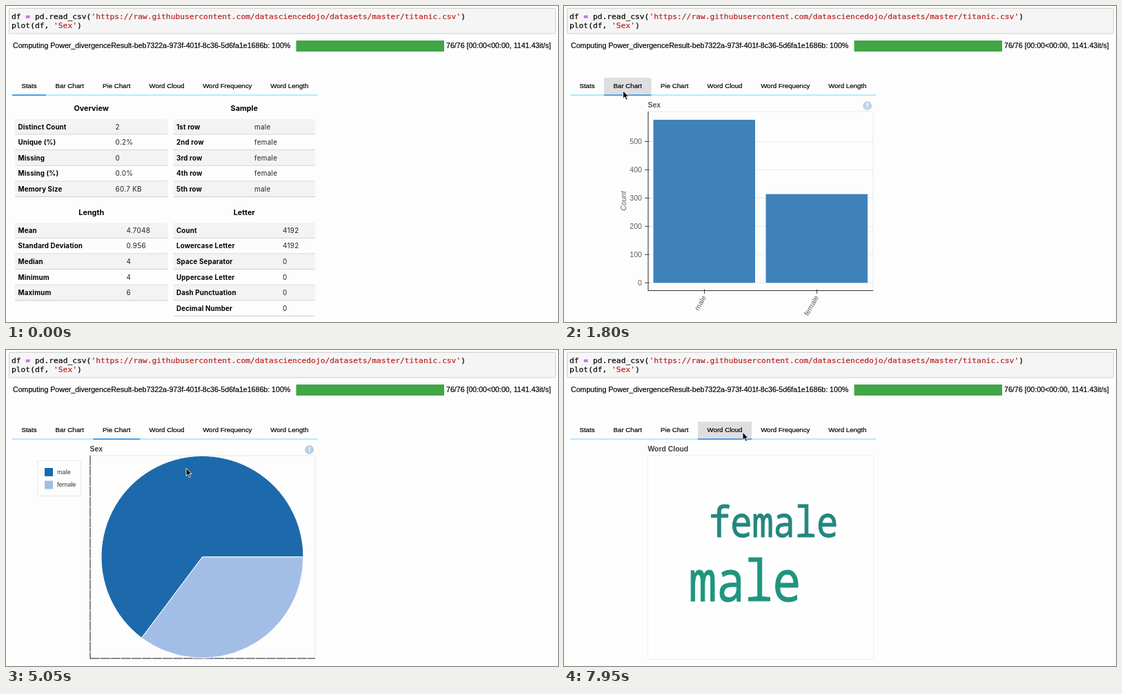
These frames come from a looping animation (800x458 px, 8 s). An HTML page:

```html
<!DOCTYPE html>
<html lang="en">
<head>
<meta charset="utf-8">
<title>Column plots</title>
<style>
  html, body { margin: 0; width: 100%; height: 100%; overflow: hidden; background: #fdfdfe; }
  svg { display: block; width: 100vw; height: 100vh; }
  text { font-family: "Liberation Sans", Arial, sans-serif; white-space: pre; }
  .code { font: 11.28px "DejaVu Sans Mono", monospace; stroke: #000; stroke-width: .2; }
  .str { fill: #ba2121; stroke: #ba2121; }
  .op { fill: #aa22ff; stroke: none; font-weight: 700; }
  .log { font-size: 10.62px; stroke: #000; stroke-width: .2; }
  .tab { font-size: 9.66px; text-anchor: middle; stroke: #000; stroke-width: .2; }
  .head { font: 700 10.8px Inter, sans-serif; text-anchor: middle; }
  .key { font: 700 9.75px Inter, sans-serif; letter-spacing: .15px; }
  .val { font: 9.9px Inter, sans-serif; letter-spacing: .3px; fill: #222; }
  .title { font-size: 10.4px; font-weight: 700; fill: #3c3c3c; }
  .axis { font-size: 10.6px; fill: #444; }
  .legend { font-size: 9.1px; fill: #333; }
  .tip { font-size: 9.45px; font-weight: 700; fill: #fff; }
  .cloud { font-family: "Noto Sans Mono", monospace; stroke-width: .9; }
</style>
</head>
<body>
<svg id="stage" viewBox="0 0 800 458"></svg>
<script>
const LOOP = 8000;
const FADE = 350;
const stage = document.getElementById('stage');

const text = (x, y, cls, str, attrs = '') => `<text x="${x}" y="${y}" class="${cls}" ${attrs}>${str}</text>`;
const rect = (x, y, w, h, fill, attrs = '') =>
  `<rect x="${x}" y="${y}" width="${w}" height="${h}" fill="${fill}" ${attrs}/>`;
const line = (x1, y1, x2, y2, color, attrs = '') =>
  `<path d="M${x1} ${y1}L${x2} ${y2}" stroke="${color}" fill="none" ${attrs}/>`;
const frame = bottom => rect(122, 153, 326, bottom - 153, 'none', 'stroke="#e5e5e5"');
const group = (id, body) => `<g id="${id}">${body}</g>`;

// Tabs: name, left edge, right edge, click time
const tabs = [
  ['Stats', 9, 58, -1000],
  ['Bar Chart', 58, 126.5, 1500],
  ['Pie Chart', 126.5, 194, 3250],
  ['Word Cloud', 194, 272, 7450],
  ['Word Frequency', 272, 369.5, Infinity],
  ['Word Length', 369.5, 452, Infinity]
];

function header() {
  const str = s => `<tspan class="str">${s}</tspan>`;
  const url = 'https://raw.githubusercontent.com/datasciencedojo/datasets/master/titanic.csv';
  return rect(4.5, 3.5, 792, 36.5, '#f6f5f6', 'stroke="#cfcfcf" rx="1.5"') +
    text(8, 19, 'code', `df <tspan class="op">=</tspan> pd.read_csv(${str(`'${url}'`)})`) +
    text(8, 32, 'code', `plot(df, ${str("'Sex'")})`) +
    text(10, 61, 'log', 'Computing Power_divergenceResult-beb7322a-973f-401f-8c36-5d6fa1e1686b: 100%') +
    rect(420.5, 50, 214.5, 16, '#42a646') +
    text(638, 61, 'log', '76/76 [00:00&lt;00:00, 1141.43it/s]');
}

function tabBar() {
  return rect(9, 128.3, 443, 1.8, '#a6eef5') + tabs.map(([name, x, end], i) =>
    rect(x, 104, end - x, 24.5, '#dedddf', `id="hover${i}"`) +
    rect(x, 128.3, end - x, 1.8, '#3d94e6', `id="ink${i}"`) +
    text((x + end) / 2, 119.4, 'tab', name)).join('');
}

function table(title, x, y, w, valueX, rows) {
  const step = 22.6;
  return text(x + w / 2, y - 11.6, 'head', title) + rows.map(([key, value], i) => {
    const top = y + i * step;
    return rect(x, top, w, step, i % 2 ? '#fdfdfe' : '#f3f3f4') +
      line(x, top + step - .5, x + w, top + step - .5, '#cfcfd0') +
      text(x + 4.5, top + 14.5, 'key', key) + text(valueX, top + 14.5, 'val', value);
  }).join('');
}

function stats() {
  const sample = ['male', 'female', 'female', 'female', 'male'];
  const places = ['1st', '2nd', '3rd', '4th', '5th'];
  return table('Overview', 13, 164, 221.5, 158.5, [['Distinct Count', '2'], ['Unique (%)', '0.2%'],
      ['Missing', '0'], ['Missing (%)', '0.0%'], ['Memory Size', '60.7 KB']]) +
    table('Sample', 242.5, 164, 205.5, 360, sample.map((s, i) => [places[i] + ' row', s])) +
    table('Length', 13, 314.3, 221.5, 174.5, [['Mean', '4.7048'], ['Standard Deviation', '0.956'],
      ['Median', '4'], ['Minimum', '4'], ['Maximum', '6']]) +
    table('Letter', 242.5, 314.3, 205.5, 401, [['Count', '4192'], ['Lowercase Letter', '4192'],
      ['Space Separator', '0'], ['Uppercase Letter', '0'], ['Dash Punctuation', '0'], ['Decimal Number', '0']]);
}

const info = `<circle class="info" cx="439.7" cy="144.5" r="6.5"/>` +
  rect(438.9, 140.5, 1.6, 5, '#fff') + rect(438.9, 146.8, 1.6, 1.6, '#fff');

function barChart() {
  const base = 401.2, unit = .4095;
  let out = frame(412.5);
  for (let n = 0; n <= 500; n += 100) {
    const y = base - n * unit;
    out += line(122, y, 448, y, '#e5e5e5') + line(117, y, 123.5, y, '#222') +
      text(113, y + 3.8, 'axis', n, 'text-anchor="end"');
  }
  [['male', 577, 129.5], ['female', 314, 292.5]].forEach(([name, n, x]) => {
    const mid = x + 74;
    out += rect(x, base - n * unit, 147.5, n * unit, '#1f6eae') +
      line(mid, 410.5, mid, 417, '#222') +
      text(0, 3.5, 'axis', name, `text-anchor="end" transform="translate(${mid} 420.5) rotate(-60)"`);
  });
  return out + line(122, 153, 122, 412.5, '#111') + line(121.5, 412.5, 448, 412.5, '#111') +
    text(0, 0, 'axis', 'Count', 'text-anchor="middle" font-style="italic" transform="translate(89.5 282.5) rotate(-90)"') +
    text(121.5, 146.7, 'title', 'Sex') + info;
}

function pieChart() {
  const cx = 284.5, cy = 300, r = 146.5, a = 314 / 891 * 2 * Math.PI;
  const edge = `${cx + r * Math.cos(a)} ${cy + r * Math.sin(a)}`, start = `${cx + r} ${cy}`;
  const wedge = (from, to, large, fill) =>
    `<path d="M${cx} ${cy}L${from}A${r} ${r} 0 ${large} 1 ${to}Z" fill="${fill}" stroke="#fff"/>`;
  const dash = 'stroke-dasharray="14 1"';
  return frame(447) + line(122, 153, 122, 447.5, '#222', dash) + line(122, 447, 448, 447, '#222', dash) +
    wedge(edge, start, 1, '#1c6aab') + wedge(start, edge, 0, '#a3bee6') +
    rect(45.5, 160.5, 63, 51, '#fefefe', 'stroke="#e8e8e8"') +
    rect(56, 171, 12, 12, '#1c6aab') + text(74, 179.8, 'legend', 'male') +
    rect(56, 189.5, 12, 12, '#a3bee6') + text(74, 198.3, 'legend', 'female') +
    text(121.5, 146.7, 'title', 'Sex') + info +
    group('tip', rect(122, 154, 326, 40, '#555', 'rx="4"') +
      text(131, 177.7, 'tip', '1.') + text(145, 177.7, 'tip', 'The top 2 categories (male, female) take over 50%'));
}

function wordCloud() {
  const word = (x, y, size, color, str) => text(0, 0, 'cloud', str,
    `font-size="${size}" fill="${color}" stroke="${color}" transform="translate(${x} ${y}) scale(1 1.2)"`);
  return rect(121.5, 152.5, 327, 296, '#fefefe', 'stroke="#eeeeef"') +
    text(121.5, 146.7, 'title', 'Word Cloud') +
    word(210, 270.5, 52, '#24877f', 'female') + word(180.7, 364, 67.7, '#1f957f', 'male');
}

const arrow = '<path d="M0 0V11.2L2.6 8.8L4.5 13.2L6.5 12.3L4.6 8.1H8Z" fill="#000" stroke="#fff" stroke-width=".9"/>';
const hand = '<path d="M-1.6 1Q0-1 1 1L1.7 4.5Q3 3.8 3.6 5Q5 4.4 5.4 5.7Q7 5.3 7 7L6.6 10L5.6 12.5H0L-3.6 8Q-4.2 6 -2.4 6.4L-.6 7.6Z" ' +
  'fill="#fff" stroke="#111"/><path d="M1.4 8.4V10.8M3.2 8.4V10.8M5 8.4V10.8" stroke="#111" stroke-width=".6"/>';

const panels = [stats, barChart, pieChart, wordCloud];
stage.innerHTML = header() + tabBar() + panels.map((p, i) => group('panel' + i, p())).join('') +
  group('arrow', arrow) + group('hand', hand);
const el = id => document.getElementById(id);

// Pointer stops: time, x, y
const stops = [
  [50, 190, 462], [800, 96, 152], [1200, 84.5, 131], [1320, 84.5, 131], [1480, 85.5, 123], [2650, 86, 123],
  [3150, 171, 124], [3350, 171, 124], [3800, 189, 123.5], [4350, 189, 123.5], [5100, 262, 172],
  [5950, 415, 168], [6360, 440, 148], [7000, 440, 148], [7430, 261, 120], [7750, 259, 119.3], [8000, 259, 119.3]
];
const clamp = v => Math.max(0, Math.min(1, v));
const ease = v => v * v * (3 - 2 * v);

function pointer(t) {
  if (t < stops[0][0]) return [-50, 500];
  const i = Math.max(1, stops.findIndex(s => s[0] >= t));
  const [t0, x0, y0] = stops[i - 1], [t1, x1, y1] = stops[i];
  const p = ease((t - t0) / (t1 - t0));
  return [x0 + (x1 - x0) * p, y0 + (y1 - y0) * p];
}

function render(t) {
  const [x, y] = pointer(t);
  const fades = tabs.map(tab => clamp((t - tab[3]) / FADE));
  const active = tabs.findLastIndex(tab => t >= tab[3]);
  const pointing = t >= 6360 && t < 7030;

  tabs.forEach(([, left, right], i) => {
    const over = y > 104 && y < 129 && x >= left && x < right;
    const next = fades[i + 1] || 0;
    el('hover' + i).setAttribute('opacity', over ? 1 : 0);
    el('ink' + i).setAttribute('opacity', ease(fades[i]) * (1 - ease(next)));
  });
  panels.forEach((_, i) => {
    const g = el('panel' + i);
    g.style.display = i === active ? '' : 'none';
    g.setAttribute('opacity', fades[i]);
  });

  el('tip').setAttribute('opacity', clamp((t - 6375) / 300) * (1 - clamp((t - 7030) / 300)));
  document.querySelectorAll('.info').forEach(c => c.setAttribute('fill', pointing ? '#83a2cb' : '#b7cee2'));
  for (const [id, shown] of [['arrow', !pointing], ['hand', pointing]]) {
    el(id).style.display = shown ? '' : 'none';
    el(id).setAttribute('transform', `translate(${x} ${y})`);
  }
}

const begin = performance.now();
function tick(now) {
  render(Math.max(0, now - begin) % LOOP);
  requestAnimationFrame(tick);
}
render(0);
requestAnimationFrame(tick);
</script>
</body>
</html>
```
